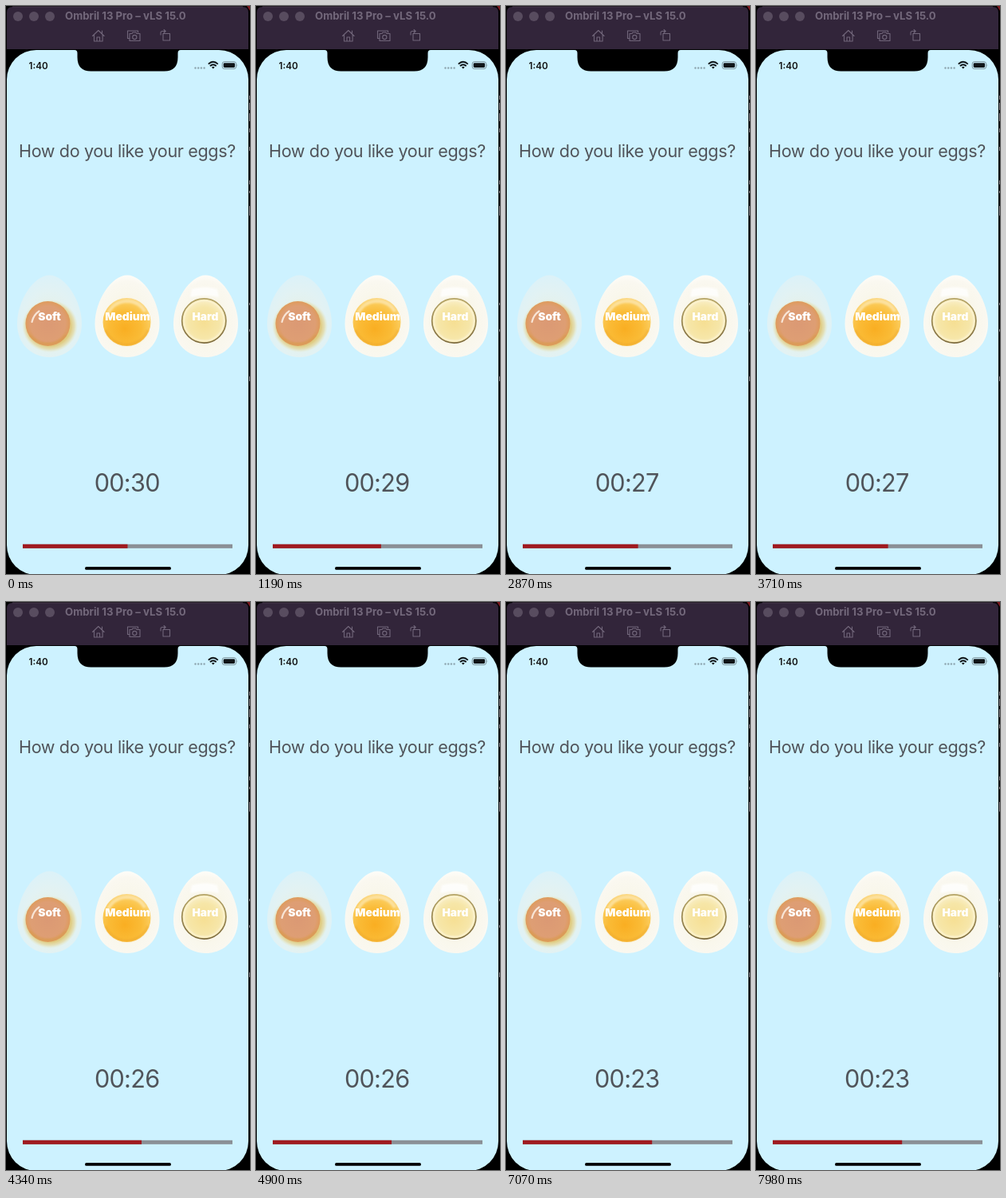
These frames come from a looping animation (306 px wide and 710 px high, 8 s). An HTML page:

```html
<!DOCTYPE html>
<html lang="en">
<head>
<meta charset="utf-8">
<title>Egg timer</title>
<style>
  html, body { margin: 0; width: 100%; height: 100%; overflow: hidden; background: #000; }
  svg { display: block; width: 306px; height: 710px; }
  text { font-family: Inter, "Open Sans", sans-serif; }
  .label { font-size: 13.8px; font-weight: 900; fill: #fff; text-anchor: middle; }
  .big { fill: #50545a; text-anchor: middle; }
</style>
</head>
<body>
<svg viewBox="0 0 306 710" xmlns="http://www.w3.org/2000/svg">
  <defs>
    <path id="egg" d="M0 336.5C20 336.5 40.5 369 40.5 397C40.5 423 22 439 0 439S-40.5 423-40.5 397C-40.5 369-20 336.5 0 336.5Z"/>
    <radialGradient id="paleWhite" cy=".6" r=".58">
      <stop offset="0" stop-color="#e9efe0"/><stop offset=".7" stop-color="#e2f2f3"/><stop offset="1" stop-color="#dcf2f8"/>
    </radialGradient>
    <radialGradient id="white" cy=".55" r=".56">
      <stop offset="0" stop-color="#fbf0d6"/><stop offset=".6" stop-color="#f9f7ec"/><stop offset=".85" stop-color="#faf8f0"/><stop offset="1" stop-color="#fffefa"/>
    </radialGradient>
    <radialGradient id="halo">
      <stop offset=".76" stop-color="#dfc877" stop-opacity=".9"/><stop offset=".88" stop-color="#e3d596" stop-opacity=".65"/><stop offset="1" stop-color="#e6e8bd" stop-opacity="0"/>
    </radialGradient>
    <radialGradient id="softYolk">
      <stop offset="0" stop-color="#db9974"/><stop offset=".78" stop-color="#de9e74"/><stop offset="1" stop-color="#de9b5c"/>
    </radialGradient>
    <radialGradient id="midYolk" cx=".46" cy=".64" r=".62">
      <stop offset="0" stop-color="#f9ae22"/><stop offset=".55" stop-color="#fabb36"/><stop offset=".85" stop-color="#fbca58"/><stop offset="1" stop-color="#fbd67e"/>
    </radialGradient>
    <radialGradient id="hardYolk" cy=".54">
      <stop offset="0" stop-color="#f6df93"/><stop offset=".7" stop-color="#f6e6a8"/><stop offset="1" stop-color="#f9eec4"/>
    </radialGradient>
    <linearGradient id="rim" x2="0" y2="1">
      <stop offset="0" stop-color="#b5a466"/><stop offset="1" stop-color="#7c6a3c"/>
    </linearGradient>
    <filter id="blur" x="-30%" y="-30%" width="160%" height="160%"><feGaussianBlur stdDeviation="1"/></filter>
  </defs>

  <!-- Window bar -->
  <rect width="306" height="710" fill="#000"/>
  <path d="M302 0h4v6z" fill="#7b1a20"/>
  <path d="M1 54V8q0-7 7-7h289q7 0 7 7v46z" fill="#32253a"/>
  <path d="M8 1h289" stroke="#4a3d50"/>
  <g fill="#584c5f">
    <circle cx="15" cy="13" r="6"/><circle cx="35" cy="13" r="6"/><circle cx="55" cy="13" r="6"/>
  </g>
  <text x="74" y="17" font-size="13.2" font-weight="700" fill="#73687b">Ombril 13 Pro – vLS 15.0</text>
  <g fill="none" stroke="#71667a" stroke-width="1.1" stroke-linejoin="round" stroke-linecap="round">
    <path d="M108.5 37.5l7.3-7 7.3 7M110.5 36v8h10.600v-8M114 44v-5h3.600v5M120.500 34v-3"/>
    <path d="M154.500 40.500h-2v-9.500h13v2M155 34.500h3l1-1.500h4l1 1.500h4v9h-13z"/>
    <circle cx="161.300" cy="39" r="2.600"/>
    <path d="M197 34.500h8.500v8.500h-8.500zM194 36v-2.500q0-2 2-2h4M198 29.500l2.200 2-2.200 2"/>
  </g>

  <!-- Phone screen -->
  <rect x="1" y="55" width="303" height="656" rx="37" fill="#cdf2ff"/>
  <path d="M86 54V55q3.500 0 3.500 4v5q0 17.500 17 17.500h92q17 0 17-17.500v-5q0-4 3.500-4v-1z" fill="#000"/>
  <text x="28.500" y="78.500" font-size="11.700" font-weight="600" fill="#111">1:40</text>
  <g fill="#8fa7b1">
    <circle cx="237.500" cy="77.500" r="1.200"/><circle cx="241.200" cy="77.500" r="1.200"/>
    <circle cx="244.900" cy="77.500" r="1.200"/><circle cx="248.600" cy="77.500" r="1.200"/>
  </g>
  <g fill="none" stroke="#101518" stroke-width="1.800">
    <path d="M253.800 72.600q6-5.600 12 0M255.900 75q3.900-3.600 7.800 0"/>
    <path d="M257.900 76.500q1.900-1.600 3.800 0l-1.900 2z" fill="#101518" stroke="none"/>
    <rect x="271.200" y="69.700" width="17.400" height="8.800" rx="2.600" stroke="#7d9299" stroke-width="1"/>
  </g>
  <rect x="272.700" y="71.200" width="14.400" height="5.800" rx="1.400" fill="#101518"/>
  <path d="M289.700 72.500q1.400 1.600 0 3.200z" fill="#7d9299"/>
  <path d="M305.500 112v5M305.500 121v9M305.500 134v10M305.500 153v5M305.500 176v5M305.500 218v5M305.500 231v3M305.500 250v12M305.500 371v3M305.500 404v3M305.500 463v6" stroke="#8a8a90"/>

  <text class="big" x="151.900" y="189" font-size="21.600" letter-spacing="-.38">How do you like your eggs?</text>

  <!-- Soft -->
  <use href="#egg" x="54.500" fill="url(#paleWhite)"/>
  <ellipse cx="55" cy="400" rx="35" ry="33" fill="url(#halo)"/>
  <circle cx="52.500" cy="397" r="28" fill="url(#softYolk)"/>
  <path d="M30 411a28 28 0 0 0 45 0" fill="none" stroke="#d59a43" stroke-width="2" opacity=".6" filter="url(#blur)"/>
  <path d="M32.500 395q2-9 9-13.500" fill="none" stroke="#f8e5d6" stroke-width="2.200" stroke-linecap="round"/>
  <text class="label" x="54.500" y="393">Soft</text>

  <!-- Medium -->
  <use href="#egg" x="152" fill="url(#white)"/>
  <circle cx="151.500" cy="395" r="30" fill="url(#midYolk)"/>
  <path d="M125 405a28.500 28.500 0 0 0 53 0" fill="none" stroke="#eda52c" stroke-width="2" opacity=".7" filter="url(#blur)"/>
  <path d="M128 384q7-14 23-15 16 0 23 13" fill="none" stroke="#fdeab8" stroke-width="4" opacity=".7" filter="url(#blur)"/>
  <text class="label" x="152.500" y="393">Medium</text>

  <!-- Hard -->
  <use href="#egg" x="250.500" fill="url(#white)"/>
  <path d="M233 354q16-5 32 0l2 10q-18-4-36 0z" fill="#fff" opacity=".8" filter="url(#blur)"/>
  <circle cx="248.300" cy="393.500" r="27.600" fill="url(#hardYolk)" stroke="url(#rim)" stroke-width="1.700"/>
  <circle cx="248.300" cy="393.500" r="25" fill="none" stroke="#fcf4d2" stroke-width="1.800" opacity=".7"/>
  <text class="label" x="250" y="393">Hard</text>

  <text class="big" id="clock" x="151.700" y="607" font-size="30.600" letter-spacing="-.7">00:30</text>
  <rect x="21" y="672.800" width="263" height="5" fill="#8b9096"/>
  <rect id="bar" x="21" y="672.800" width="131.500" height="5" fill="#a01a1f"/>
  <rect x="99" y="701" width="108" height="3.800" rx="1.900" fill="#000"/>
</svg>
<script>
  const LOOP = 8000, TICK = 1050, LEAD = 280;
  const TOTAL = 60, START = 30, BAR_WIDTH = 263;
  const clock = document.getElementById('clock');
  const bar = document.getElementById('bar');

  function draw(time) {
    const left = START - Math.floor((time % LOOP + LEAD) / TICK);
    clock.textContent = '00:' + String(left).padStart(2, '0');
    bar.setAttribute('width', BAR_WIDTH * (TOTAL - left) / TOTAL);
  }

  function frame() {
    draw(performance.now());
    requestAnimationFrame(frame);
  }
  frame();
</script>
</body>
</html>
```
